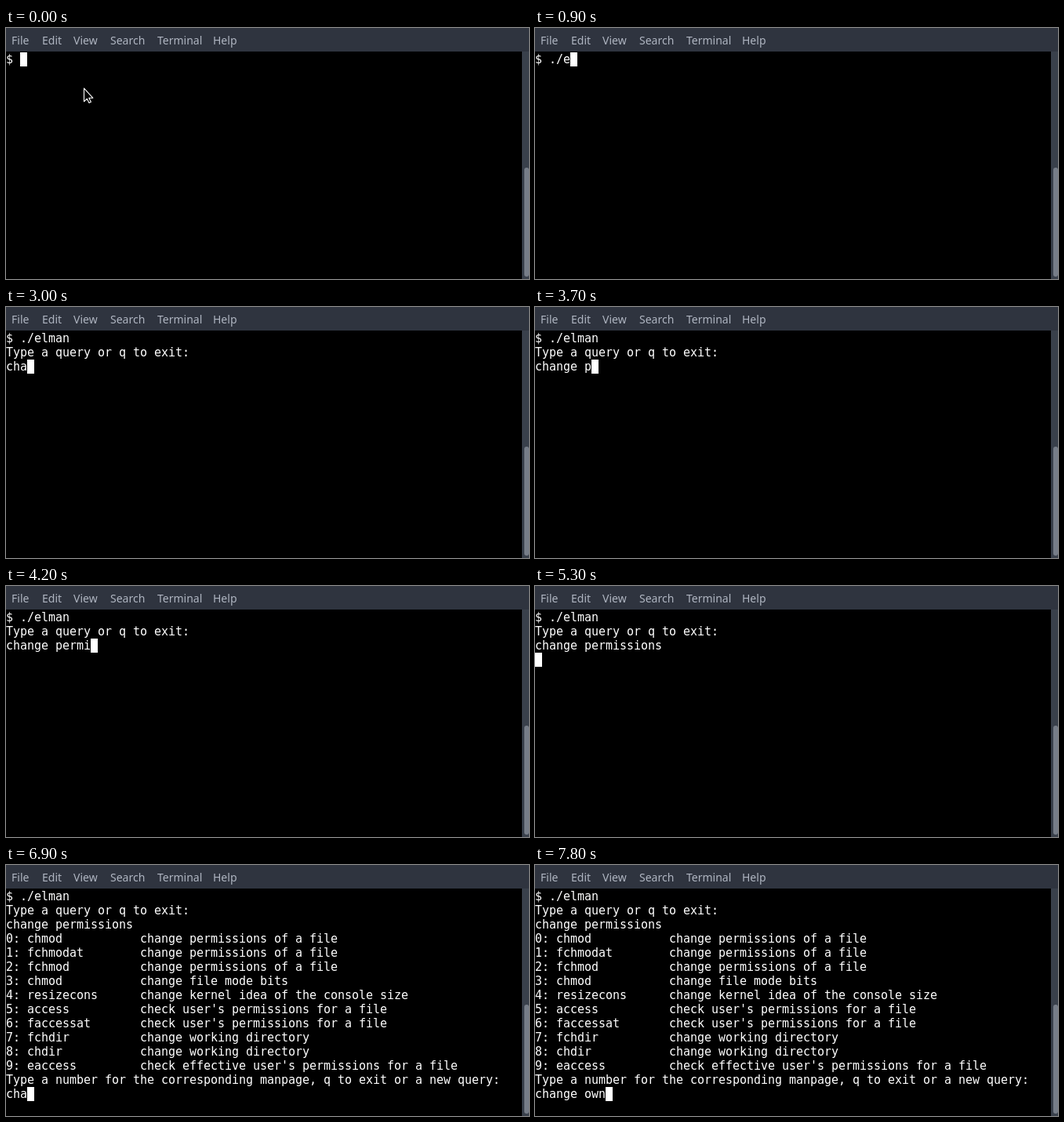
Write an HTML page that moves like this. It is 667 px wide and 320 px high and loops after 8 s.

```html
<!DOCTYPE html>
<html lang="en">
<head>
<meta charset="utf-8">
<title>Terminal</title>
<style>
  html, body { margin: 0; width: 100%; height: 100%; overflow: hidden; background: #000; }
  svg { display: block; }
  .menu { font: 14px "Noto Sans", "Open Sans", sans-serif; fill: #afb5c1; }
  .term text { font: 15px "DejaVu Sans Mono", monospace; letter-spacing: -.03px; fill: #fff; white-space: pre; }
</style>
</head>
<body>
<svg width="667" height="320" viewBox="0 0 667 320">
  <rect width="667" height="320" fill="#000"/>
  <rect width="667" height="30" fill="#2f343f"/>
  <rect x="658" y="30" width="9" height="290" fill="#39404b"/>
  <rect x="661" y="178" width="6" height="139" rx="3" fill="#767d88"/>
  <g id="menu" class="menu"></g>
  <g id="lines" class="term"></g>
  <rect id="cursor" width="9" height="18" fill="#fff"/>
  <path id="pointer" d="M99.5 76.8V93.8L103.3 90.2L106 95.5L108.4 94.3L105.8 89.2H110.8Z"
        fill="#000" stroke="#fff" stroke-width="1.1" stroke-linejoin="round"/>
</svg>
<script>
const LOOP = 8000, CELL = 9, ROW = 18, TOP = 31, ROWS = 16;
const BLINK = 600, KEY_GAP = 100, FIRST_KEY = 500;
const NS = "http://www.w3.org/2000/svg";
const $ = id => document.getElementById(id);

function addText(parent, x, y, str) {
  const el = document.createElementNS(NS, "text");
  el.setAttribute("x", x);
  el.setAttribute("y", y);
  el.textContent = str;
  parent.appendChild(el);
  return el;
}

Object.entries({ File: 7, Edit: 46, View: 86, Search: 133, Terminal: 193, Help: 264 })
  .forEach(([word, x]) => addText($("menu"), x, 21, word));

const rows = Array.from({ length: ROWS }, (_, i) => addText($("lines"), 0, TOP + 14 + i * ROW, ""));

const results = [
  "chmod: change permissions of a file",
  "fchmodat: change permissions of a file",
  "fchmod: change permissions of a file",
  "chmod: change file mode bits",
  "resizecons: change kernel idea of the console size",
  "access: check user's permissions for a file",
  "faccessat: check user's permissions for a file",
  "fchdir: change working directory",
  "chdir: change working directory",
  "eaccess: check effective user's permissions for a file"
].map((entry, i) => {
  const [name, about] = entry.split(": ");
  return `${i}: ${name.padEnd(16)}${about}\n`;
}).join("");

const events = [];
const print = (time, text) => events.push({ time, text });
// Types a burst; "|" separates strokes
const type = (time, burst) => burst.split("|").forEach((text, i) =>
  events.push({ time: time + i * KEY_GAP, text, key: true }));

type(200 - BLINK, "$ ");
type(FIRST_KEY, "");
type(700, "./");
type(900, "e|lman ");
type(1400, "\n");
print(1600, "Type a query or q to exit:\n");
type(2800, "c|h|a|n|g");
type(3400, "e ");
type(3700, "p");
type(3900, "e|r|m|i");
type(4400, "s");
type(4700, "si");
type(4900, "on");
type(5300, "s\n");
print(5500, results + "Type a number for the corresponding manpage, q to exit or a new query:\n");
type(6600, "c");
type(6800, "h|a|n|g");
type(7300, "e |o");
type(7800, "wn");

function show(el, on) {
  el.setAttribute("visibility", on ? "visible" : "hidden");
}

function draw(t) {
  const past = events.filter(e => e.time <= t);
  const lines = past.map(e => e.text).join("").split("\n");
  rows.forEach((el, i) => {
    const str = lines[i] || "";
    if (el.textContent !== str) el.textContent = str;
  });

  // The cursor blinks from the latest key stroke on
  const idle = t - past.filter(e => e.key).pop().time;
  const row = lines.length - 1;
  $("cursor").setAttribute("x", lines[row].length * CELL);
  $("cursor").setAttribute("y", TOP + row * ROW);
  show($("cursor"), Math.floor(idle / BLINK) % 2 === 0);

  $("pointer").setAttribute("transform", t < 300 ? "" : "translate(-2 -1)");
  show($("pointer"), t < FIRST_KEY);
}

const start = performance.now();
function tick() {
  draw((performance.now() - start) % LOOP);
  requestAnimationFrame(tick);
}
tick();
</script>
</body>
</html>
```
